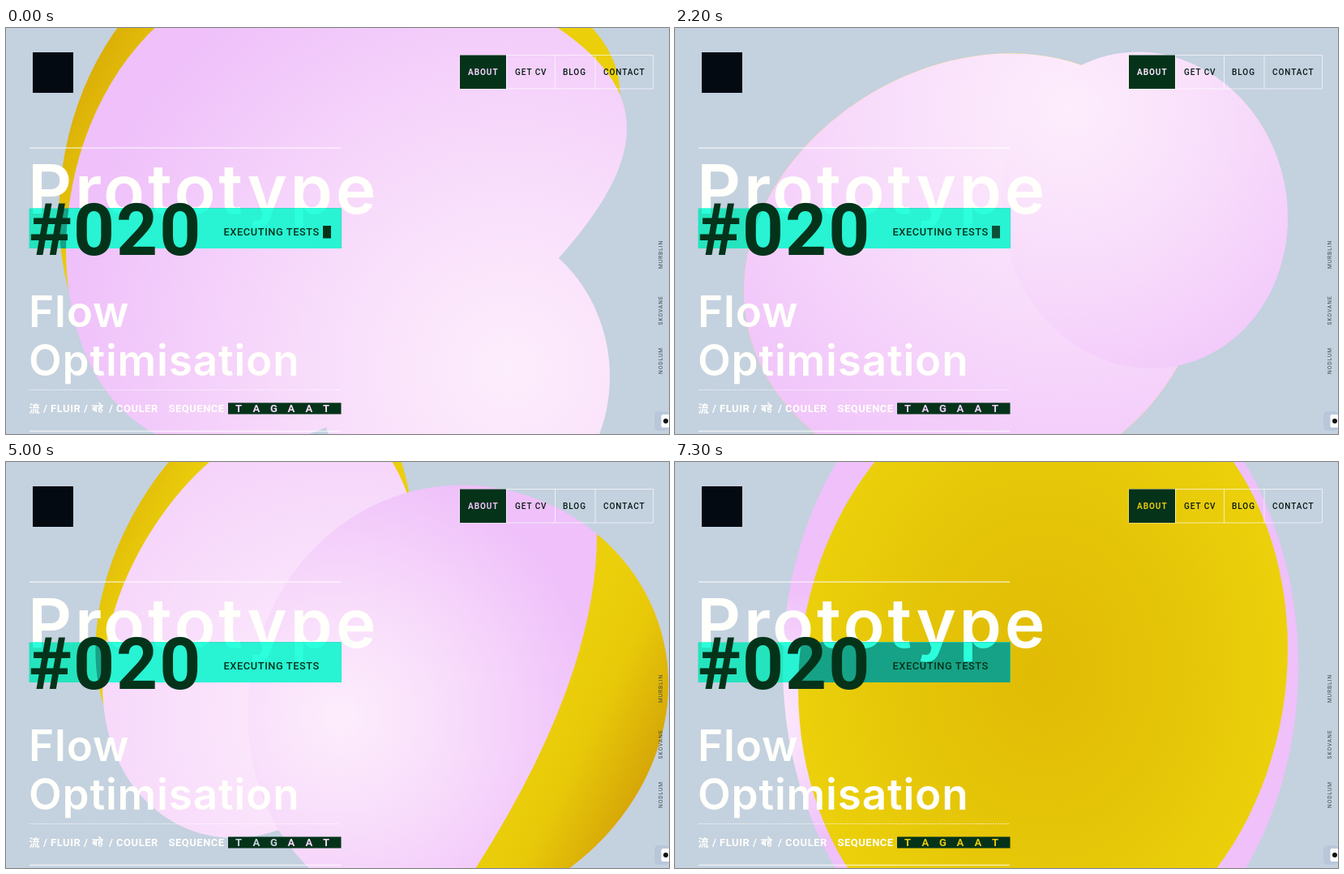
An HTML page for the animation above (7400 ms loop, 818 px wide and 501 px high).

```html
<!DOCTYPE html>
<html lang="en">
<head>
<meta charset="utf-8">
<title>Prototype #020</title>
<style>
  html, body { margin: 0; width: 100%; height: 100%; overflow: hidden; background: #c4d1df; }
  svg { display: block; width: 818px; height: 501px; }
  text { font-family: Roboto, "Noto Sans", "Noto Sans CJK SC", sans-serif; font-weight: 500; white-space: pre; }
  .title { font: 600 84px Inter, sans-serif; letter-spacing: 3.7px; }
  .sub { font: 600 53px Inter, sans-serif; letter-spacing: .8px; }
  .number { font-size: 89px; font-weight: 700; letter-spacing: 2px; }
  .status { font-size: 12.8px; letter-spacing: .6px; }
  .meta { font-size: 13px; font-weight: 600; letter-spacing: .5px; }
  .nav { font-size: 10px; letter-spacing: .95px; }
  .bold { font-weight: 700; }
  .side { font-size: 6.6px; font-weight: 400; letter-spacing: 1px; fill: #3b4a4c; }
  .white { fill: #fffffb; }
  .dark { fill: #04331a; }
  .rule { stroke: #fff; stroke-opacity: .65; fill: none; }
</style>
</head>
<body>
<svg viewBox="0 0 818 501">
  <defs>
    <radialGradient id="bodyTint" gradientUnits="userSpaceOnUse">
      <stop stop-color="#fdeefc"/><stop offset=".45" stop-color="#f8dcfb"/><stop offset="1" stop-color="#efc0fa"/>
    </radialGradient>
    <radialGradient id="lobeTint" href="#bodyTint" gradientUnits="userSpaceOnUse"/>
    <linearGradient id="rimTint" gradientUnits="userSpaceOnUse" x1="700" y1="230" x2="840" y2="300">
      <stop stop-color="#ebcf0b"/><stop offset=".4" stop-color="#e8c909"/><stop offset="1" stop-color="#d5a507"/>
    </linearGradient>
    <linearGradient id="backTint" gradientUnits="userSpaceOnUse" x1="80" y1="110" x2="190" y2="170">
      <stop stop-color="#d8a807"/><stop offset="1" stop-color="#ebcf0b"/>
    </linearGradient>
    <radialGradient id="holeTint">
      <stop stop-color="#e1bb05"/><stop offset=".55" stop-color="#e5c508"/><stop offset="1" stop-color="#ebd00b"/>
    </radialGradient>
    <path id="body"/><path id="lobe"/><path id="rim"/><path id="hole"/>
    <use id="back" href="#body"/>
    <text id="title" class="title" x="27" y="229">Prototype</text>
    <clipPath id="inLobe"><use href="#lobe"/></clipPath>
    <clipPath id="inBand"><rect x="28.5" y="222.5" width="385" height="49.5"/></clipPath>
    <mask id="cutout" maskUnits="userSpaceOnUse" x="0" y="0" width="818" height="501">
      <rect width="818" height="501" fill="#fff"/>
      <text class="nav bold" x="570" y="58">ABOUT</text>
      <text class="meta" x="283 304.5 326 347.5 369.5 391" y="474">TAGAAT</text>
    </mask>
  </defs>

  <rect width="818" height="501" fill="#c4d1df"/>
  <use href="#back" fill="url(#backTint)"/>
  <use href="#body" fill="url(#bodyTint)"/>
  <use href="#lobe" fill="url(#lobeTint)"/>
  <g clip-path="url(#inLobe)">
    <use href="#rim" fill="url(#rimTint)"/>
    <use href="#hole" fill="url(#holeTint)"/>
  </g>

  <use href="#title" class="white"/>
  <g clip-path="url(#inBand)">
    <rect width="818" height="501" fill="#24e4be"/>
    <use href="#back" fill="#16a286"/>
    <g fill="#28f3d3"><use href="#body"/><use href="#lobe"/></g>
    <g clip-path="url(#inLobe)" fill="#16a286"><use href="#rim"/><use href="#hole"/></g>
    <use href="#title" fill="#2cffdc"/>
  </g>
  <g class="dark">
    <text class="number" x="28" y="280">#020</text>
    <text class="status" x="268.5" y="256">EXECUTING TESTS</text>
    <rect id="cursor" x="391" y="244" width="10" height="15.5"/>
  </g>

  <g class="white">
    <text class="sub" x="28" y="368.5">Flow</text>
    <text class="sub" x="28" y="429">Optimisation</text>
    <text class="meta" x="28.5" y="474">流</text>
    <text class="meta" x="46" y="474">/ FLUIR /</text>
    <text class="meta" x="106" y="474">बहे</text>
    <text class="meta" x="127" y="474">/ COULER</text>
    <text class="meta" x="200.5" y="474">SEQUENCE</text>
  </g>
  <path class="rule" d="M29 148H413M29 497.5H413" stroke-width="1.3"/>
  <path class="rule" d="M29 446.5H413" stroke-dasharray="2 1"/>

  <rect x="33" y="30" width="50" height="50" fill="#030a12"/>

  <path class="rule" d="M560 33.5H798.5V75H560ZM617.5 33V75M677.5 33V75M727 33V75" stroke-opacity=".5"/>
  <g class="dark" mask="url(#cutout)">
    <rect x="560" y="33.5" width="57" height="41.5"/>
    <rect x="274" y="462.5" width="139.5" height="14"/>
  </g>
  <g fill="#051a14">
    <text class="nav" x="628" y="58">GET CV</text>
    <text class="nav" x="687" y="58">BLOG</text>
    <text class="nav" x="737" y="58">CONTACT</text>
  </g>

  <text class="side" transform="translate(809.5 297) rotate(-90)">MURBLIN</text>
  <text class="side" transform="translate(809.5 366.5) rotate(-90)">SKOVANE</text>
  <text class="side" transform="translate(809.5 427) rotate(-90)">NODLUM</text>
  <rect x="800" y="473" width="18" height="24" rx="5" fill="#8ea3c8" opacity=".22"/>
  <rect x="808.5" y="477" width="14" height="16" rx="2" fill="#fff"/>
  <circle cx="814" cy="485" r="3" fill="#111"/>
</svg>
<script>
const LOOP = 7400, STEP = 100;
const $ = id => document.getElementById(id);

// An egg: centre, half width and height, lean of its waist, growth towards the right.
const egg = (x, y, w, h, lean = 0, taper = 0) => [x, y, w, h, lean, taper];

const body = {
  0: egg(420, 199, 346, 283, -75, -.31),
  1400: egg(394, 265, 347, 289, -29, -.19),
  3100: egg(346, 317, 210, 243, -30, .3),
  4200: egg(335, 222, 184, 278, -60),
  5800: egg(293, 207, 206, 216, -65, .2),
  6800: egg(270, 193, 167, 192, -40),
  7300: egg(300, 250, 150, 180)
};
const lobe = {
  0: egg(565, 430, 180, 192),
  1400: egg(560, 240, 165, 170),
  3100: egg(600, 242, 197, 232, 13),
  4200: egg(580, 275, 223, 256, -32),
  5800: egg(532, 306, 290, 282, 0, -.08),
  6800: egg(492, 300, 273, 360, 0, .1),
  7300: egg(451, 252, 318, 412)
};
const hole = {
  6200: egg(570, 230, 0, 0),
  6800: egg(532, 237, 195, 216, -12),
  7300: egg(454, 255, 302, 375, -25)
};
// Top, bend and foot of the rim's inner edge, as x.
const rim = { 2400: [800, 850, 850], 3100: [714, 725, 835], 4200: [728, 685, 620], 5800: [745, 821, 612], 6500: [850, 900, 900] };
// Highlight position, and how far it reaches over the lobe.
const light = {
  0: [620, 420, 560], 1400: [510, 75, 560], 3100: [470, 200, 310], 4200: [440, 325, 290],
  5800: [365, 290, 330], 6800: [200, 320, 170], 7300: [100, 320, 170]
};

// Smooth interpolation through unevenly spaced keys, held at both ends.
function at(t, track) {
  const times = Object.keys(track).map(Number), rows = Object.values(track);
  const last = times.length - 1;
  if (t <= times[0]) return rows[0];
  if (t >= times[last]) return rows[last];
  const i = times.findIndex(v => v > t) - 1;
  const span = times[i + 1] - times[i], u = (t - times[i]) / span;
  const slope = (k, n) => {
    const p = Math.max(k - 1, 0), q = Math.min(k + 1, last);
    return (rows[q][n] - rows[p][n]) / (times[q] - times[p]) * span;
  };
  return rows[i].map((v, n) => {
    const w = rows[i + 1][n], a = slope(i, n), b = slope(i + 1, n);
    return v + u * (a + u * (3 * (w - v) - 2 * a - b + u * (2 * (v - w) + a + b)));
  });
}

function outline([x, y, w, h, lean, taper], sides = 120) {
  const points = Array.from({ length: sides }, (_, i) => {
    const angle = i / sides * 2 * Math.PI, c = Math.cos(angle), s = Math.sin(angle);
    return [x + w * c, y + lean * c + h * (1 + taper * c) * s].map(v => v.toFixed(1));
  });
  return `M${points.join('L')}Z`;
}

const set = (id, attrs) => {
  for (const name in attrs) $(id).setAttribute(name, attrs[name]);
};

function draw(t) {
  for (const [id, track] of Object.entries({ body, lobe, hole })) set(id, { d: outline(at(t, track)) });

  // The inside peeks out behind the body's upper left.
  const peek = Math.max(0, Math.sin((t - 4000) / 3000 * Math.PI)) * (t < LOOP - 400);
  set('back', { transform: `translate(${-10 * peek} ${-50 * peek})` });

  const [top, bend, foot] = at(t, rim);
  set('rim', { d: `M${top} 60Q${bend} 250 ${foot} 508H1000V60Z` });

  const [cx, cy, reach] = at(t, light);
  set('bodyTint', { cx, cy, r: 560 });
  set('lobeTint', { cx, cy, r: reach });

  const blink = t % 2000;
  set('cursor', { opacity: Math.max(0, 1 - (blink / 500) ** 2) });
}

let shown = -1;
function tick() {
  const t = Math.floor((performance.now() + 1) / STEP) * STEP % LOOP;
  if (t !== shown) draw(shown = t);
  requestAnimationFrame(tick);
}
tick();
</script>
</body>
</html>
```
